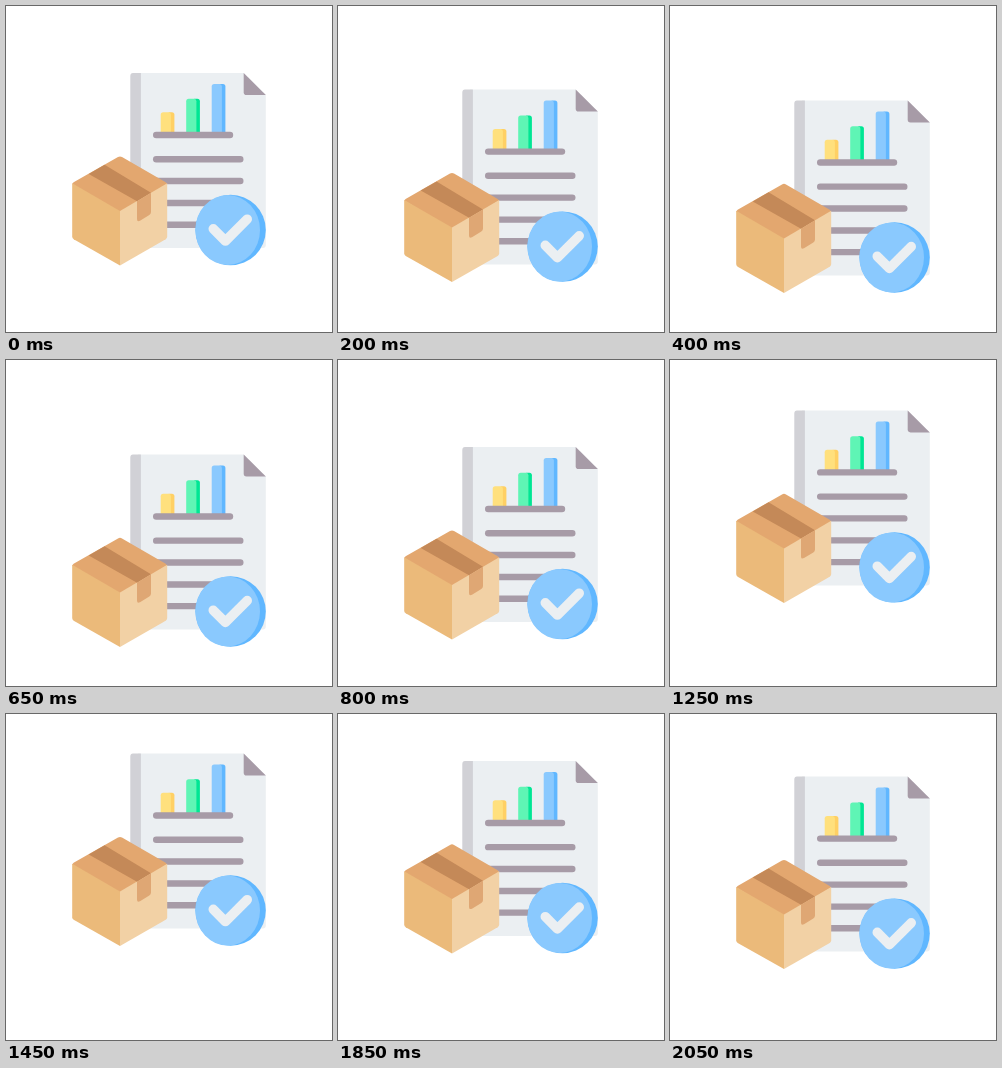
An HTML page with a canvas for the animation above (2.1 s loop, 326x326 px).

```html
<!DOCTYPE html>
<html lang="en">
<head>
<meta charset="utf-8">
<title>Delivery report</title>
<style>
html, body { margin: 0; width: 100%; height: 100%; overflow: hidden; background: #fff; }
canvas { display: block; width: 326px; height: 326px; }
</style>
</head>
<body>
<canvas id="stage"></canvas>
<script>
const SIZE = 326, LOOP = 2100, STEP = 50, SWING = 29.5;
const canvas = document.getElementById('stage');
const ctx = canvas.getContext('2d');
const ratio = window.devicePixelRatio || 1;
canvas.width = canvas.height = Math.round(SIZE * ratio);

const PAPER = '#ebeff2', MAUVE = '#a79ba7', SKY = '#8ac9fe', BLUE = '#60b7ff';

function fill(path, color) {
  ctx.fillStyle = color;
  ctx.fill(new Path2D(path));
}

function stroke(path, color, width) {
  ctx.strokeStyle = color;
  ctx.lineWidth = width;
  ctx.lineCap = ctx.lineJoin = 'round';
  ctx.stroke(new Path2D(path));
}

function disc(x, y, rx, ry, color) {
  ctx.fillStyle = color;
  ctx.beginPath();
  ctx.ellipse(x, y, rx, ry, 0, 0, Math.PI * 2);
  ctx.fill();
}

function rule(y, right) {
  stroke(`M150.2 ${y}H${right}`, MAUVE, 6.4);
}

function bar(x, top, light, dark) {
  fill(`M${x + 8} ${top}H${x + 11.2}Q${x + 13.7} ${top} ${x + 13.7} ${top + 2.5}V127H${x + 8}Z`, dark);
  fill(`M${x + 2.5} ${top}H${x + 8}Q${x + 10.2} ${top} ${x + 10.2} ${top + 2.5}V127H${x}V${top + 2.5}Q${x} ${top} ${x + 2.5} ${top}Z`, light);
}

function report() {
  fill('M132 67H237.7L259.8 89V239Q259.8 242 256.8 242H132Z', PAPER);
  fill('M127 67H134.9V242H127Q124.3 242 124.3 239V70Q124.3 67 127 67Z', '#d1d1d6');
  fill('M237.7 67L259.8 89H240.5Q237.7 89 237.7 86.2Z', MAUVE);
  bar(154.7, 106.3, '#ffe07d', '#ffd064');
  bar(180.2, 92.8, '#5ff5b5', '#00e694');
  bar(205.7, 78, SKY, BLUE);
  rule(129, 224);
  rule(153.2, 234.3);
  rule(175, 234.3);
  rule(197, 215);
  rule(218.7, 205);
}

function parcel() {
  fill('M66.2 178L67.6 176.3L112 151Q114 149.8 116 151L159.7 176.3L161.2 178L114 207Z', '#e3a76f');
  fill('M66.2 177.3L114 205V259.5L67.7 233.3Q66.2 232.4 66.2 230.6Z', '#ebba7a');
  fill('M161.2 177.3L114 205V259.5L159.7 233.3Q161.2 232.4 161.2 230.6Z', '#f2d1a5');
  fill('M82.7 168L98.6 158.8L145 186.8L131 195.2Z', '#c48958');
  fill('M131 195.2L145 186.8V206Q145 208 143.3 209L134 214.7Q131 216.2 131 213Z', '#dfa774');
}

function badge() {
  disc(224.6, 224, 35.2, 35.2, BLUE);
  disc(221.7, 224, 32.3, 35, SKY);
  stroke('M207.3 222.8L219.4 235L241.2 213.2', PAPER, 9.6);
}

function draw(now) {
  const t = Math.floor((now % LOOP) / STEP) * STEP;
  const dy = SWING * Math.sin(2 * Math.PI * t / LOOP);
  ctx.setTransform(ratio, 0, 0, ratio, 0, 0);
  ctx.fillStyle = '#fff';
  ctx.fillRect(0, 0, SIZE, SIZE);
  ctx.translate(0, dy);
  report();
  parcel();
  badge();
}

let start;
function tick(now) {
  if (start === undefined) start = now;
  draw(Math.max(0, now - start));
  requestAnimationFrame(tick);
}
draw(0);
requestAnimationFrame(tick);
</script>
</body>
</html>
```
